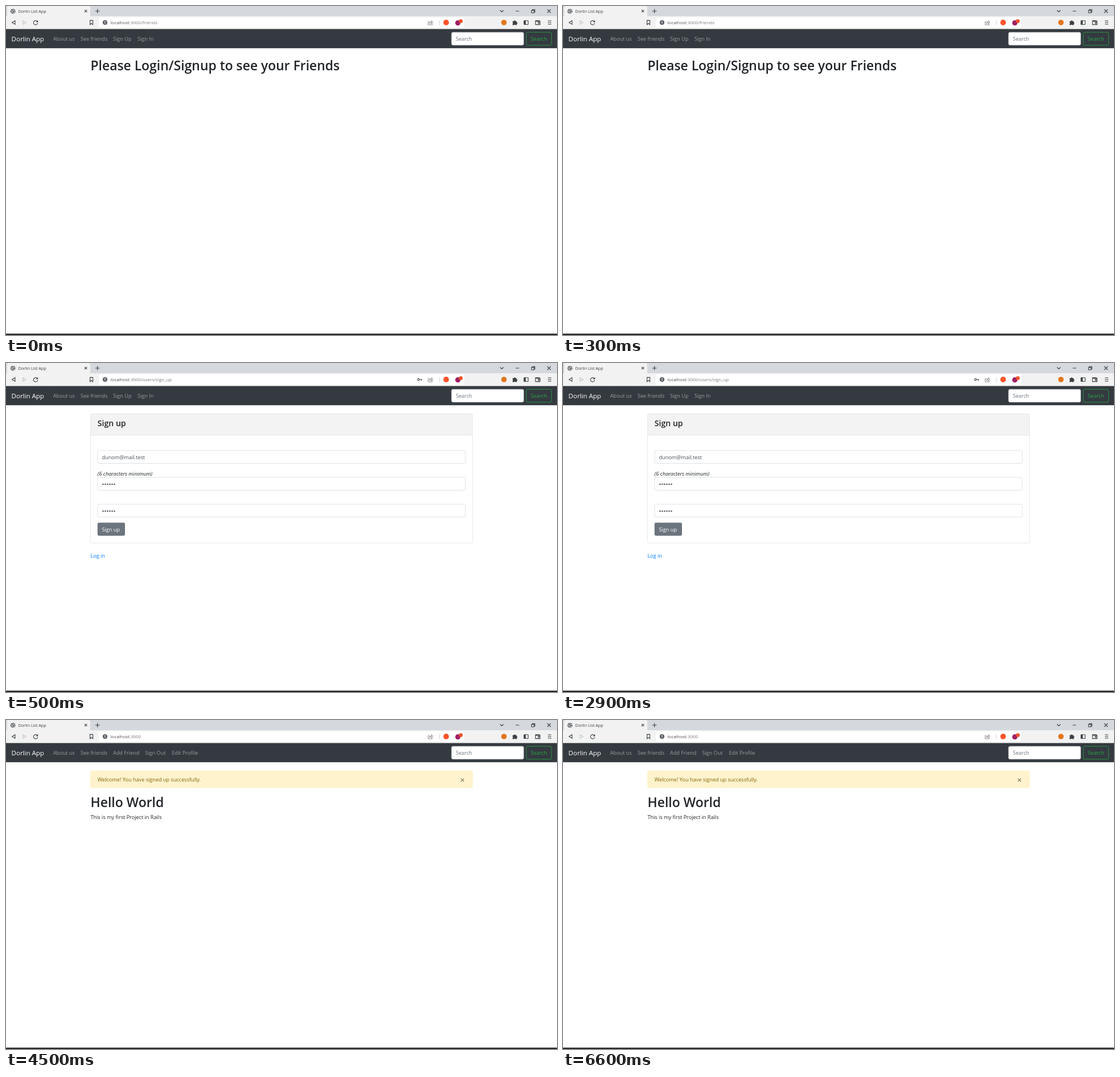
Animation of 968 by 578 pixels, one loop 8 s. Source, as an HTML page:

```html
<!DOCTYPE html>
<html lang="en">
<head>
<meta charset="utf-8">
<title>Dorlin List App</title>
<style>
  html, body { margin: 0; width: 100%; height: 100%; overflow: hidden; background: #fff; }
  svg { display: block; width: 968px; height: 578px; font: 9.13px "Open Sans", "Noto Sans", sans-serif; fill: #212529; }
  .page { display: none; }
  .heading { font-size: 22.9px; font-weight: 600; }
  .nav { fill: #999c9f; }
  .url { font-size: 7.95px; fill: #7b7b7b; }
  .host { fill: #4f4f4f; }
  .field { fill: #fff; stroke: #ced4da; stroke-width: .7; }
  .value { fill: #495057; }
  .line { fill: none; stroke: #3c4043; stroke-width: 1.1; }
  .thin { fill: none; stroke: #777; stroke-width: .9; }
</style>
</head>
<body>
<svg viewBox="0 0 968 578">
  <!-- Tab strip -->
  <rect width="968" height="41" fill="#f2f2f2"/>
  <path d="M0 0H968V18H148V3Q148 0 145 0H5Q2 0 2 3V18H0Z" fill="#d5d8dc"/>
  <circle cx="12.2" cy="9.2" r="4.3" fill="#5f6368"/>
  <path d="M9 8.2L11.2 9.6L10.8 12.4M11.6 5.6L12.4 7.4L15.6 8.6M13.2 12.6L14.8 10.4" fill="none" stroke="#f2f2f2" stroke-width="1.1"/>
  <text x="21.5" y="11.6" font-size="7.2" fill="#3c4043">Dorlin List App</text>
  <path class="line" d="M138 6.8L142.4 11.2M142.4 6.8L138 11.2M160.7 5.2V12.8M156.9 9H164.5"/>
  <path class="line" d="M868 7.5L871 10.5L874 7.5M895.5 9H901.5M951 6L957 12M957 6L951 12"/>
  <path class="line" stroke-width=".9" d="M923.3 7.6H927.7V12H923.3ZM924.7 7.4V6.2H929.1V10.6H927.9"/>

  <!-- Toolbar -->
  <path class="line" d="M15.9 25.7V32.3L10.6 29ZM147.6 25.4H152.6V32.8L150.1 30.6L147.6 32.8Z"/>
  <path d="M30 25.7V32.3L35.3 29Z" fill="none" stroke="#b9bbbd"/>
  <path class="line" d="M54.9 27A3.7 3.7 0 1 0 55.7 30"/>
  <path d="M56.2 24.9V28.6H52.5Z" fill="#3c4043"/>
  <rect x="163" y="20" width="642" height="18" rx="2.5" fill="#fff"/>
  <circle cx="174" cy="29" r="4.2" fill="#5f6368"/>
  <path d="M174 26.4V29.7M174 30.6V31.6" stroke="#fff" stroke-width="1.1"/>
  <path class="thin" d="M744 27.5H741.8V33H748.8V31M744 31Q744.2 27.7 747.4 27.7V25.8L750.2 28.4L747.4 31V29.3Q745.3 29.2 744 31Z"/>
  <path d="M761.3 25V33.5" stroke="#c8c8c8" stroke-width=".8"/>
  <circle cx="773.2" cy="29" r="4.9" fill="#fb542b"/>
  <circle cx="793.8" cy="29.7" r="4.6" fill="#9e1f63"/>
  <circle cx="799" cy="26.6" r="3.4" fill="#f0522d"/>
  <circle cx="874.8" cy="29" r="4.8" fill="#e2761b"/>
  <path d="M890 26.8H892.2A1.5 1.5 0 0 1 895.2 26.8H897.3V28.7A1.5 1.5 0 0 1 897.3 31.6V33.6H894.9A1.3 1.3 0 0 0 892.4 33.6H890V31.2A1.3 1.3 0 0 0 890 28.9Z" fill="#3c4043"/>
  <rect class="line" x="910" y="25.7" width="7.4" height="6.8" rx=".8"/>
  <rect x="910" y="25.7" width="3" height="6.8" fill="#3c4043"/>
  <path class="line" d="M937 26.8V25.7H930.2V32.6H938.2V26.9H930.2M938.2 28.6H935V30.8H938.2M952 26H958M952 29H958M952 32H958"/>

  <!-- Site navigation -->
  <rect y="40.5" width="968" height="33.7" fill="#343a40"/>
  <text x="9.6" y="62.3" font-size="11.5" fill="#fff">Dorlin App</text>
  <g class="nav">
    <text x="82.8" y="61.4">About us</text>
    <text x="130.9" y="61.4">See friends</text>
  </g>
  <rect class="field" x="782.8" y="46.2" width="126.6" height="22.6" rx="2.4"/>
  <text x="790.2" y="61.4" fill="#6c757d">Search</text>
  <rect x="914.2" y="46.2" width="44.2" height="22.6" rx="2.4" fill="none" stroke="#28a745" stroke-width=".8"/>
  <text x="921.8" y="61.4" fill="#28a745">Search</text>

  <g class="page" data-path=":3000/friends" data-links="188 Sign Up,231 Sign In">
    <text class="heading" x="148.5" y="113.4">Please Login/Signup to see your Friends</text>
  </g>

  <g class="page" data-path=":3000/users/sign_up" data-links="188 Sign Up,231 Sign In">
    <circle class="line" cx="724.6" cy="29" r="1.7"/>
    <path class="line" stroke-width="1.4" d="M726.4 29H731M729.6 29V31"/>
    <rect x="148.6" y="89.3" width="671" height="227" rx="2.4" fill="#fff"/>
    <path d="M148.6 126.7V91.7Q148.6 89.3 151 89.3H817.2Q819.6 89.3 819.6 91.7V126.7Z" fill="#f3f3f3"/>
    <path d="M148.6 126.7H819.6" stroke="#dedede" stroke-width=".7"/>
    <rect x="148.6" y="89.3" width="671" height="227" rx="2.4" fill="none" stroke="#dedede" stroke-width=".7"/>
    <text x="160.8" y="111.4" font-size="14.1" font-weight="600">Sign up</text>
    <rect class="field" x="161" y="153.8" width="646" height="22.6" rx="2.4"/>
    <text class="value" x="168.5" y="169.2">dunom@mail.test</text>
    <text x="160.8" y="197.5" font-style="italic">(6 characters minimum)</text>
    <rect class="field" x="161" y="200.9" width="646" height="22.6" rx="2.4"/>
    <rect class="field" x="161" y="248.1" width="646" height="22.6" rx="2.4"/>
    <path d="M170.5 213H191M170.5 260.2H191" stroke="#495057" stroke-width="2.6" stroke-linecap="round" stroke-dasharray="0 4"/>
    <rect x="160.8" y="280.5" width="48.2" height="23" rx="2.4" fill="#6c757d"/>
    <text x="168.5" y="295.8" fill="#fff">Sign up</text>
    <text x="148.4" y="342" fill="#007bff">Log in</text>
  </g>

  <g class="page" data-path=":3000" data-links="188 Add Friend,244.3 Sign Out,291.4 Edit Profile">
    <rect x="148.5" y="89.2" width="671.2" height="29.8" rx="2.4" fill="#fff3cd" stroke="#ffeeba" stroke-width=".6"/>
    <text x="160.8" y="107.9" fill="#856404">Welcome! You have signed up successfully.</text>
    <path d="M799.2 103L804.6 108.4M804.6 103L799.2 108.4" stroke="#8d8060" stroke-width="1.3"/>
    <text class="heading" x="148.5" y="152.9">Hello World</text>
    <text x="148.4" y="173.8">This is my first Project in Rails</text>
  </g>

  <rect y="575.6" width="968" height="2.4" fill="#25272b"/>
</svg>
<script>
  const LOOP = 8000;
  const starts = [0, 500, 4500];
  const pages = [...document.querySelectorAll(".page")];

  function addText(parent, className, x, y, content) {
    const text = document.createElementNS("http://www.w3.org/2000/svg", "text");
    text.setAttribute("class", className);
    text.setAttribute("x", x);
    text.setAttribute("y", y);
    text.innerHTML = content;
    parent.append(text);
  }

  for (const page of pages) {
    addText(page, "url", 183.6, 31.9, `<tspan class="host">localhost</tspan>${page.dataset.path}`);
    for (const link of page.dataset.links.split(",")) {
      const [x, ...words] = link.split(" ");
      addText(page, "nav", x, 61.4, words.join(" "));
    }
  }

  function draw() {
    const time = performance.now() % LOOP;
    const current = starts.filter(start => start <= time).length - 1;
    pages.forEach((page, i) => page.style.display = i === current ? "inline" : "none");
    requestAnimationFrame(draw);
  }
  draw();
</script>
</body>
</html>
```
